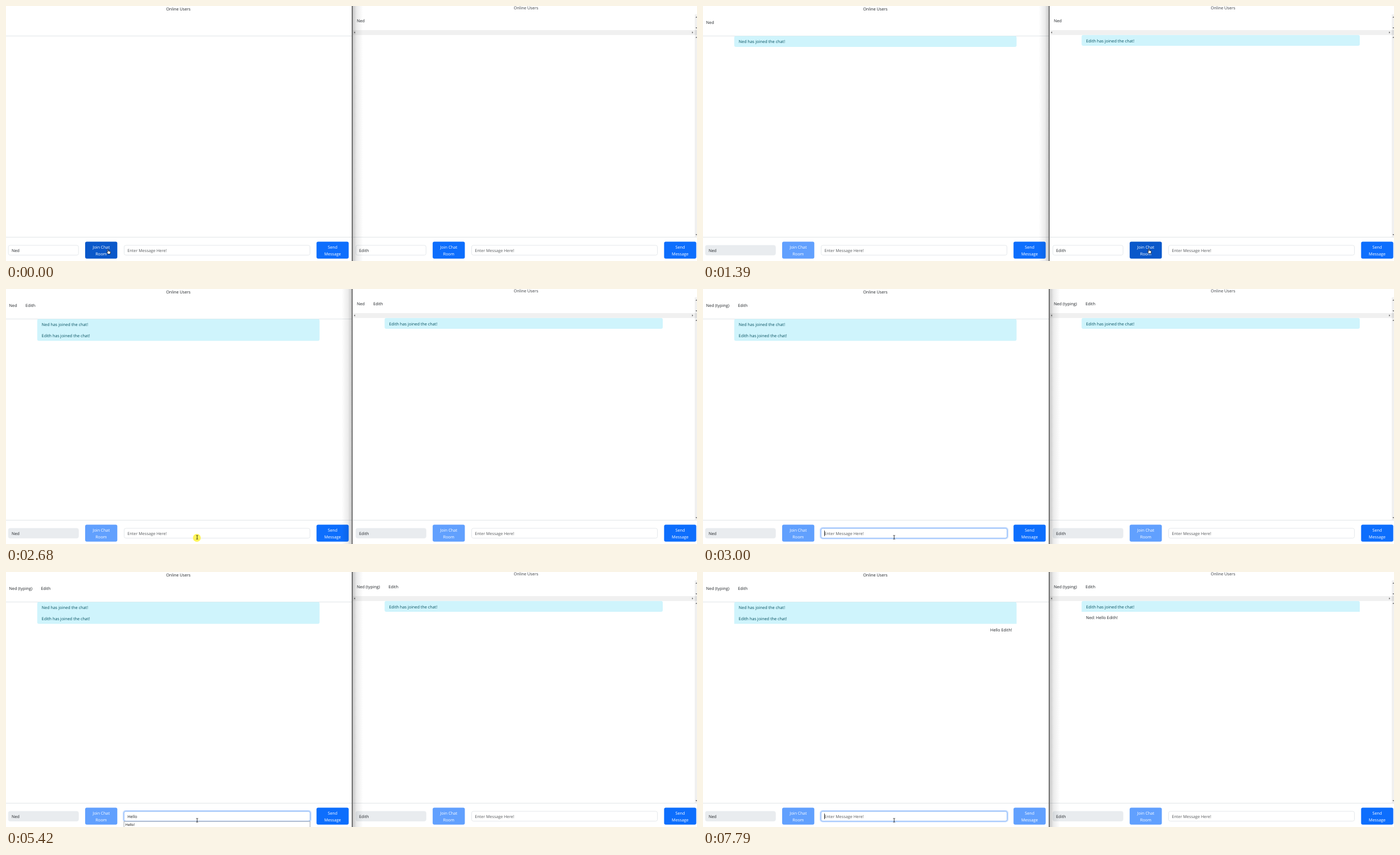
An HTML page with a canvas for the animation above (8 s loop, 1231 by 455 pixels).

```html
<!DOCTYPE html>
<html lang="en">
<head>
<meta charset="utf-8">
<title>Chat room</title>
<style>
  html, body { margin: 0; width: 100%; height: 100%; overflow: hidden; background: #fff; }
  canvas { display: block; }
</style>
</head>
<body>
<canvas id="stage" width="1231" height="455"></canvas>
<script>
const ctx = document.getElementById('stage').getContext('2d');
const LOOP = 8000, INK = '#212529', LINE = '#dee2e6', MUTED = '#595c5f';
const HOST = 'Ned', GUEST = 'Edith', MESSAGE = `Hello ${GUEST}!`;
const KEYS = [4260, 4540, 4720, 4910, 5060, 6360, 6640, 6780, 6880, 6980, 7140, 7490];
const SUGGESTIONS = ['Hello!', 'Hi!', 'Hey there!', 'How are you?', 'Have a nice day', 'Hope you are well'];
const BLUE = [13, 110, 253], HOVER = [11, 94, 215], ACTIVE = [10, 88, 202];
const T = { hostJoin: 60, hover: 880, press: 1250, guestJoin: 1390, synced: 1440,
            click: 2680, raise: 2730, focus: 2780, typing: 2830, send: 7790 };

const between = (t, a, b) => t >= a && t < b;
const clamp = v => Math.max(0, Math.min(1, v));
const ease = v => { v = clamp(v); return v * v * (3 - 2 * v); };
const mix = (a, b, p) => a + (b - a) * p;
const blend = (a, b, p) => a.map((v, i) => mix(v, b[i], clamp(p)));
const rgb = c => `rgb(${c.map(Math.round)})`;

function text(s, x, midY, color = INK, align = 'left', size = 7.3) {
  ctx.font = `${size}px "Open Sans", "Noto Sans", sans-serif`;
  ctx.textRendering = 'geometricPrecision';
  ctx.textAlign = align;
  ctx.fillStyle = color;
  ctx.fillText(s, x, midY + size * 0.36);
  return ctx.measureText(s).width;
}

function rect(x, y, w, h, color) {
  ctx.fillStyle = color;
  ctx.fillRect(x, y, w, h);
}

function box(x, y, w, h, radius, fill, stroke, width = 1) {
  ctx.beginPath();
  ctx.roundRect(x, y, w, h, radius);
  if (fill) { ctx.fillStyle = fill; ctx.fill(); }
  if (stroke) { ctx.strokeStyle = stroke; ctx.lineWidth = width; ctx.stroke(); }
}

function field(x, w, value, color, disabled) {
  box(x + 0.5, 427, w - 1, 17.5, 3, disabled ? '#e9ecef' : '#fff', disabled ? '#e9ecef' : LINE, 0.8);
  return text(value, x + 6.2, 436, color);
}

function button(x, lines, color, disabled) {
  ctx.globalAlpha = disabled ? 0.65 : 1;
  box(x, 420.5, 57.3, 30.3, 3, rgb(color));
  ctx.globalAlpha = 1;
  lines.forEach((s, i) => text(s, x + 28.6, 430.5 + i * 11.5, '#fff', 'center'));
}

function users(x, y, names) {
  for (const name of names) x += text(name, x, y) + 15.2;
}

function notices(x, y, w, names, closed) {
  if (!names.length) return;
  const bottom = closed ? 0 : 3;
  box(x, y, w, 19.4 * names.length, [3, 3, bottom, bottom], '#cff4fc');
  names.forEach((n, i) => text(`${n} has joined the chat!`, x + 8, y + 10.2 + i * 19.4, '#055160'));
}

function triangle(x, y, angle) {
  ctx.save();
  ctx.translate(x, y);
  ctx.rotate(angle);
  ctx.beginPath();
  ctx.moveTo(1.2, 0);
  ctx.lineTo(-0.8, -1.7);
  ctx.lineTo(-0.8, 1.7);
  ctx.fillStyle = '#606060';
  ctx.fill();
  ctx.restore();
}

function scrollbars() {
  rect(618, 43, 609, 8.7, '#f0f0f0');
  rect(1227, 15, 4, 397, '#f0f0f0');
  rect(1227, 43, 4, 8.7, '#dcdcdc');
  triangle(621, 47.3, Math.PI);
  triangle(1223, 47.3, 0);
  [20, 56].forEach(y => triangle(1230, y, -Math.PI / 2));
  [39, 408].forEach(y => triangle(1230, y, Math.PI / 2));
}

function divider(rightActive) {
  const end = rightActive ? 598 : 636;
  const shade = ctx.createLinearGradient(617, 0, end, 0);
  shade.addColorStop(0, 'rgba(0,0,0,.24)');
  shade.addColorStop(0.4, 'rgba(0,0,0,.08)');
  shade.addColorStop(1, 'rgba(0,0,0,0)');
  rect(Math.min(617, end), 0, 19, 455, shade);
  rect(616, 0, 1.3, 455, '#3c3c3c');
}

function dropdown(t) {
  if (!between(t, 4310, 6700)) return;
  const above = t < 4600;
  const top = above ? 367.5 : 445;
  box(210.2, top, 331.5, above ? 60 : 30, 0, '#fff', '#8a8f96', 0.8);
  (above ? SUGGESTIONS : SUGGESTIONS.slice(0, 1))
    .forEach((s, i) => text(s, 212.6, top + 5.6 + i * 9.8, '#000', 'left', 6.2));
}

function messageField(t) {
  const sent = t >= T.send;
  const typed = sent ? '' : MESSAGE.slice(0, KEYS.filter(k => t >= k).length);
  const width = field(210, 332, typed || 'Enter Message Here!', typed ? INK : MUTED);
  if (t < T.focus) return;
  const glow = clamp((t - T.focus) / 150);
  box(209, 426, 334, 19.5, 4, null, `rgba(13,110,253,${0.25 * glow})`, 2);
  box(210.3, 427.2, 331.4, 17.2, 3, null, `rgba(134,183,254,${glow})`, 0.9);
  const hidden = between(t, 3290, 3820) || between(t, 5420, 5930);
  if (!hidden) rect(typed ? 216 + width : 216, 431, 0.9, 10, '#222');
  dropdown(t);
}

function pointer(t) {
  if (t < 710) {
    const p = ease((t - 60) / 700) / ease(650 / 700);
    return [mix(181, 790, p), mix(434, 401, p)];
  }
  if (t < 850) {
    const p = (t - 710) / 140;
    return [mix(790, 816, p), mix(401, 424, p)];
  }
  if (t < 1820) {
    const p = ease((t - 850) / 200);
    return [mix(816, 793.5, p), mix(424, 433, p)];
  }
  const p = ease((t - 1820) / 800), q = 1 - p;
  return [mix(793.5, 340.5, p), q * q * 433 + 2 * p * q * 139 + p * p * 443];
}

const ARROW = 'M0 0V8.2L1.9 6.5L3.1 9.2L4.3 8.7L3.1 6.1H5.7Z';
const HAND = 'M0 .6Q.8-.4 1.5.6V3.2L4.6 3.9Q5.4 4.2 5.2 5.2L4.6 8.6H.6L-1.6 5.4Q-1.6 4.3-.6 4.9L0 5.4Z';
const BEAM = 'M-1.7-3.3H-.4L0-2.9L.4-3.3H1.7M0-2.9V2.9M-1.7 3.3H-.4L0 2.9L.4 3.3H1.7';

function cursor(t) {
  const [x, y] = pointer(t);
  if (between(t, T.press, 1360) || between(t, T.click, 2830)) {
    const center = t < T.click ? y + 1 : 444;
    box(x - 7.5, center - 7, 14, 14, 7, 'rgba(255,242,60,.85)');
  }
  const inY = y > 420 && y < 451;
  const overButton = inY && [141, 553, 760, 1172].some(b => x > b && x < b + 58);
  const overField = y > 427 && y < 445 && [[4, 130], [210, 542], [623, 749]].some(([a, b]) => x > a && x < b);
  ctx.save();
  ctx.translate(x, y);
  ctx.lineWidth = 0.8;
  ctx.strokeStyle = '#111';
  ctx.fillStyle = '#fff';
  const path = new Path2D(overField ? BEAM : overButton ? HAND : ARROW);
  if (!overField) ctx.fill(path);
  ctx.stroke(path);
  ctx.restore();
}

function leftPane(t) {
  const joined = t >= T.hostJoin, synced = t >= T.synced, sent = t >= T.send;
  text('Online Users', 307, 5.7, INK, 'center');
  const names = [];
  if (joined) names.push(t >= T.typing ? `${HOST} (typing)` : HOST);
  if (synced) names.push(GUEST);
  users(5.6, 28.9, names);
  rect(0, 53, 616, 0.9, LINE);
  notices(55.6, 53.6, 503, [HOST, GUEST].slice(0, joined + synced), sent);
  if (sent) text(MESSAGE, 550.6, 102.9, INK, 'right');
  rect(0, 412, 616, 0.9, LINE);
  field(3.7, 126, HOST, INK, joined);
  button(141, ['Join Chat', 'Room'], joined ? blend(ACTIVE, BLUE, (t - T.hostJoin) / 150) : ACTIVE, joined);
  button(553.2, ['Send', 'Message'], BLUE, sent);
  messageField(t);
}

function rightPane(t) {
  const synced = t >= T.synced, sent = t >= T.send;
  text('Online Users', 926.3, 3, '#3a3e42', 'center');
  const names = [t >= T.typing ? `${HOST} (typing)` : HOST];
  if (synced) names.push(GUEST);
  users(624.9, 26.2, names);
  scrollbars();
  notices(674.5, 51.7, 495.5, t >= T.guestJoin ? [GUEST] : [], sent);
  if (sent) text(`${HOST}: ${MESSAGE}`, 682.2, 81.2);
  rect(618, 412, 613, 0.9, LINE);
  field(622.8, 126, GUEST, INK, synced);
  let color = blend(BLUE, HOVER, (t - T.hover) / 150);
  if (t >= T.press) color = blend(HOVER, ACTIVE, (t - T.press) / 100);
  if (synced) color = BLUE;
  button(760.1, ['Join Chat', 'Room'], color, synced);
  field(829, 332, 'Enter Message Here!', MUTED);
  button(1172.4, ['Send', 'Message'], BLUE);
}

function draw(now) {
  const t = now % LOOP;
  rect(0, 0, 1231, 455, '#fff');
  leftPane(t);
  rightPane(t);
  divider(between(t, T.press, T.raise));
  cursor(t);
}

const start = performance.now();
(function tick() {
  draw(performance.now() - start);
  requestAnimationFrame(tick);
})();
</script>
</body>
</html>
```
